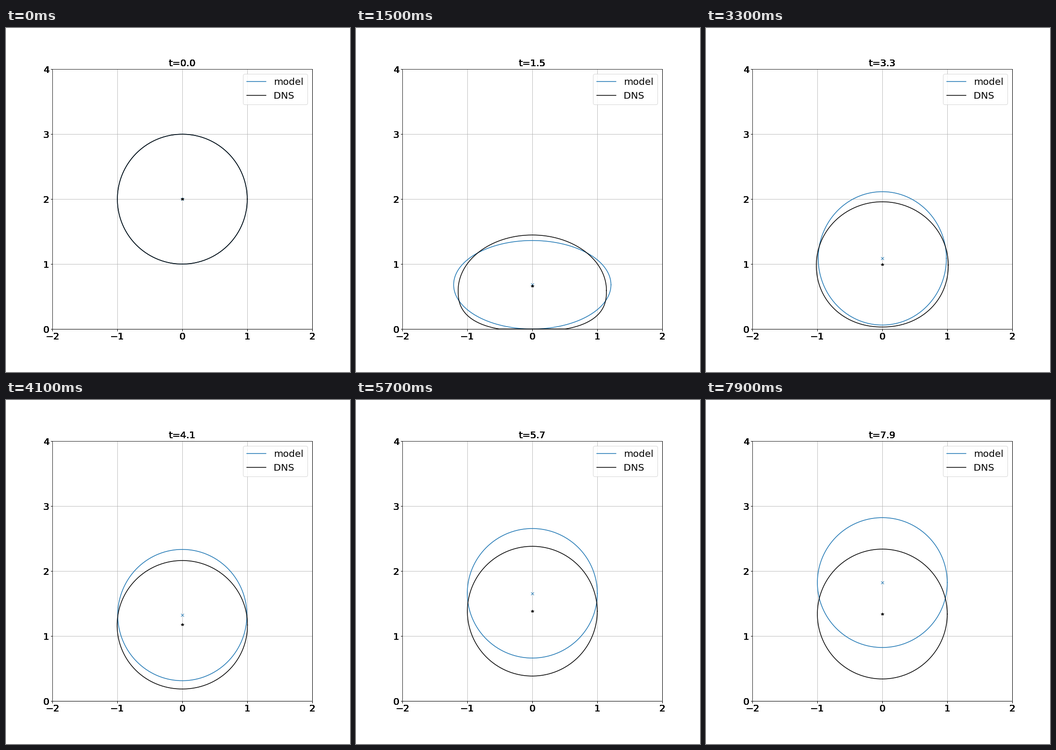
Animation of 720x720 px, one loop 8000 ms. Source, as a matplotlib script:

```python
import numpy as np
import matplotlib.pyplot as plt
from matplotlib.animation import FuncAnimation

plt.rcParams.update({"font.family": "DejaVu Sans", "font.size": 20,
                     "axes.titlesize": 20})

FRAMES, STEP = 80, 0.1
RECT = [0.135, 0.125, 0.755, 0.755]
LAYERS = 8

theta = np.linspace(0, 2 * np.pi, 400)
cos, sin = np.cos(theta), np.sin(theta)


def power(x, p):
    return np.sign(x) * np.abs(x) ** p


def swing(t, t0, t1, a, b):
    """Cosine easing from a to b."""
    u = np.clip((t - t0) / (t1 - t0), 0, 1)
    return a + (b - a) * (1 - np.cos(np.pi * u)) / 2


def hermite(t, t0, t1, y0, y1, v0, v1):
    """Cubic joining two points with given speeds."""
    h = t1 - t0
    u = (t - t0) / h
    s = u * u * (3 - 2 * u)
    return y0 + (y1 - y0) * s + h * u * (1 - u) * (v0 * (1 - u) - v1 * u)


def model_drop(t):
    """Spheroid of fixed volume that rests on the floor while in contact."""
    hit, flat, tall = 1.016, 1.78, 3.3
    if t < flat:
        u = max(0, (t - hit) / (flat - hit))
        b = .632 + .368 * (1 - u) ** 2
    elif t < tall:
        b = swing(t, flat, tall, .632, 1.027)
    else:
        b = (swing(t, tall, 4.9, 1.027, .995)
             + swing(t, 4.9, 6.5, 0, .005))
    if t < hit:
        path = 2 - .948 * t - .0354 * t ** 2
    else:
        path = 1.824 - .0354 * (t - 7.86) ** 2
    y = max(b, path)
    return cos / np.sqrt(b), y + b * sin, y


def dns_path(t):
    """Free fall, rebound, and a smooth bounce between them."""
    def fall(t):
        return 2 - .98 * t - .04 * t ** 2

    def rise(t):
        return 1.412 - .0398 * (t - 6.55) ** 2

    hit, leave = 1.0, 2.3
    if t < hit:
        return fall(t)
    if t < leave:
        return hermite(t, hit, leave, fall(hit), rise(leave), -1.06, .338)
    return rise(t)


def dns_drop(t):
    """Half ellipse above a blunter half, cut off by the floor."""
    y = dns_path(t)
    s = max(0, t - 1)
    squash = np.exp(1.2 - 1.5 * s) * (1 - np.exp(-3 * s ** 2.5))
    a = 1 + .24 * squash ** 1.2
    mid = y - .08 * squash
    up = 1 + y - .305 * squash - mid
    down = min(1.055 * mid, 1 - .45 * squash)
    e = np.where(sin < 0, 2 / (2 + .85 * squash), 1)
    px = a * power(cos, e)
    py = mid + np.where(sin < 0, down, up) * power(sin, e)
    return px, np.maximum(py, 0), y + .03 * squash


fig = plt.figure(figsize=(10, 10), dpi=72)

# Stacked identical axes give the labels their heavy, overprinted edges
titles = []
for k in range(LAYERS):
    ax = fig.add_axes(RECT, label=f"layer{k}")
    ax.set(xlim=(-2, 2), ylim=(0, 4), xticks=range(-2, 3), yticks=range(5))
    titles.append(ax.set_title("t=0.0"))

ax.grid(True)
drops = []
for shape, name, color, marker in ((model_drop, "model", "tab:blue", "x"),
                                   (dns_drop, "DNS", "black", "*")):
    line, = ax.plot([], [], color=color, label=name)
    mark, = ax.plot([], [], marker, color=color)
    drops.append((shape, line, mark))
ax.legend(loc="upper right")


def update(n):
    t = n * STEP
    for shape, line, mark in drops:
        x, y, centre = shape(t)
        line.set_data(x, y)
        mark.set_data([0], [centre])
    for title in titles:
        title.set_text(f"t={t:.1f}")
    return [artist for drop in drops for artist in drop[1:]] + titles


anim = FuncAnimation(fig, update, frames=FRAMES, interval=100,
                     repeat=True, repeat_delay=0, blit=False)
plt.show()
```
